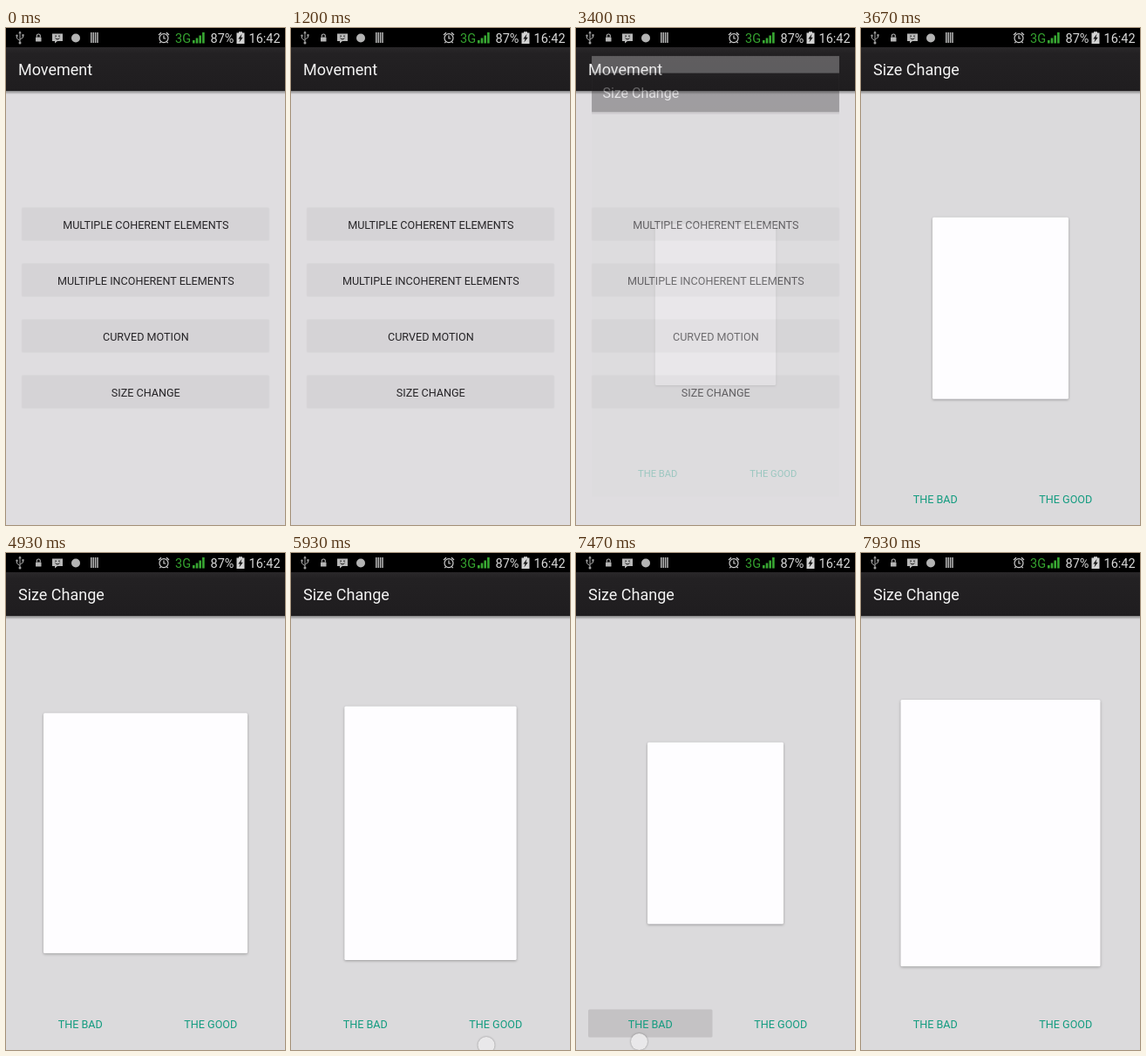
Animation, 320 px wide and 569 px high, one loop 8000 ms. Source, as an HTML page:

```html
<!DOCTYPE html>
<html lang="en">
<head>
<meta charset="utf-8">
<title>Size change</title>
<style>
html, body { margin: 0; width: 100%; height: 100%; overflow: hidden; background: #000; }
svg { display: block; width: 100vw; height: 100vh; font-family: Roboto, "Noto Sans", sans-serif; }
.title { font-size: 18px; fill: #f3f3f3; }
.label { font-size: 12.6px; text-anchor: middle; fill: #262427; }
.action { font-size: 12.6px; text-anchor: middle; fill: #149c80; }
.status { font-size: 14.5px; fill: #d8d8d8; }
#card { filter: drop-shadow(0 1px 1.5px rgba(0,0,0,.3)); }
#dot { filter: drop-shadow(0 0 1.2px rgba(0,0,0,.4)); }
</style>
</head>
<body>
<svg viewBox="0 0 320 569" preserveAspectRatio="none">
  <defs>
    <linearGradient id="bar" x1="0" y1="0" x2="0" y2="1">
      <stop offset="0" stop-color="#2a282a"/><stop offset=".15" stop-color="#232123"/><stop offset="1" stop-color="#1f1d1f"/>
    </linearGradient>
    <linearGradient id="shade" x1="0" y1="0" x2="0" y2="1">
      <stop offset="0" stop-color="#000" stop-opacity=".4"/><stop offset="1" stop-color="#000" stop-opacity="0"/>
    </linearGradient>
    <g id="head">
      <rect y="22" width="320" height="50" fill="url(#bar)"/>
      <rect y="72" width="320" height="4" fill="url(#shade)"/>
    </g>
  </defs>

  <g id="menu">
    <rect width="320" height="569" fill="#dfdde0"/>
    <use href="#head"/>
    <text class="title" x="14" y="54">Movement</text>
  </g>

  <g id="demo">
    <rect width="320" height="569" fill="#dbdadc"/>
    <use href="#head"/>
    <text class="title" x="14" y="54">Size Change</text>
    <rect id="card" rx="1.5" fill="#fefdff"/>
    <rect id="badPress" x="14" y="522.5" width="142.5" height="32" rx="1.5" fill="#c4c2c4"/>
    <rect id="goodPress" x="163.5" y="522.5" width="142.5" height="32" rx="1.5" fill="#c4c2c4"/>
    <text class="action" x="85.3" y="543.7">THE BAD</text>
    <text class="action" x="234.8" y="543.7">THE GOOD</text>
  </g>

  <g id="statusBar">
    <rect width="320" height="22" fill="#000"/>
    <!-- usb -->
    <g fill="none" stroke="#a2a2a2" stroke-width="1">
      <path d="M16 5V17M16 14.5L12.5 12V9M16 13L19.5 11V8.5"/>
      <path d="M14.3 6.2L16 3.2L17.7 6.2Z" fill="#a2a2a2" stroke="none"/>
      <circle cx="16" cy="17" r="1.5" fill="#a2a2a2" stroke="none"/>
      <circle cx="12.5" cy="8.8" r="1.2" fill="#a2a2a2" stroke="none"/>
      <rect x="18.4" y="7.2" width="2.2" height="2.2" fill="#a2a2a2" stroke="none"/>
    </g>
    <!-- lock -->
    <rect x="34" y="10.5" width="6.5" height="5" rx=".6" fill="#b5b5b5"/>
    <path d="M35.3 10.5V9a2 2 0 0 1 4 0V10.5" fill="none" stroke="#b5b5b5" stroke-width="1.1"/>
    <!-- message -->
    <path d="M53 6.5H65V15H59L56 17.5V15H53Z" fill="#b8b8b8"/>
    <path d="M56.5 11.3Q59 14.5 61.5 11.3" fill="none" stroke="#111" stroke-width="1"/>
    <path d="M56.5 8.5h1.2v1.4h-1.2zM60.4 8.5h1.2v1.4h-1.2z" fill="#111"/>
    <circle cx="80" cy="11.5" r="5" fill="#b4b4b4"/>
    <path d="M97.8 5V17M100.2 5V17M102.6 5V17M105 5V17" stroke="#b8b8b8" stroke-width="1.5"/>
    <!-- alarm -->
    <g fill="none" stroke="#cfcfcf" stroke-width="1.2">
      <circle cx="181" cy="11.6" r="5"/>
      <path d="M181 8.5V12H183.4M175 8L178 5.2M187 8L184 5.2M177.6 15.6L176.3 17.2M184.4 15.6L185.7 17.2"/>
    </g>
    <text class="status" x="194" y="17" style="fill:#35a32f">3G</text>
    <path d="M214 14h2.6v3.5h-2.6zM217.7 11.5h2.6v6h-2.6zM221.4 8.5h2.6v9h-2.6zM225.1 5h2.6v12.5h-2.6z" fill="#38a832"/>
    <text class="status" x="234.5" y="17">87%</text>
    <path d="M267 4.2H271V5.6H273.5V18H264.5V5.6H267Z" fill="#d2d2d2"/>
    <path d="M270.6 6.8L266.3 12.4H268.6L267.3 16.6L271.8 10.8H269.4Z" fill="#151515"/>
    <text class="status" x="278.5" y="17">16:42</text>
  </g>

  <circle id="dot" r="9.5" fill="#f1f0f1" fill-opacity=".92"/>
</svg>
<script>
const LOOP = 8000, STEP = 1000 / 15;
const $ = id => document.getElementById(id);
const set = (el, attrs) => { for (const k in attrs) el.setAttribute(k, attrs[k]); };
const add = (parent, tag, attrs) => {
  const el = document.createElementNS("http://www.w3.org/2000/svg", tag);
  set(el, attrs);
  return parent.appendChild(el);
};
const show = (el, on) => el.setAttribute("visibility", on ? "visible" : "hidden");
const progress = (t, start, length) => Math.min(1, Math.max(0, (t - start) / length));
const easeOut = (p, power = 2) => 1 - (1 - p) ** power;
const within = (t, a, b) => t >= a && t < b;

const buttons = ["MULTIPLE COHERENT ELEMENTS", "MULTIPLE INCOHERENT ELEMENTS", "CURVED MOTION", "SIZE CHANGE"]
  .map((name, i) => {
    const y = 205.5 + i * 64;
    const box = add($("menu"), "rect", { x: 18, y, width: 284, height: 38, rx: 1.5, fill: "#d5d3d6", stroke: "#dad8db", "stroke-width": .8 });
    add($("menu"), "text", { class: "label", x: 160.3, y: y + 24.2 }).textContent = name;
    return box;
  });

const taps = [
  { from: 2530, to: 2595, x: 64.5, y: 418 },
  { from: 4660, to: 4795, x: 230, y: 548 },
  { from: 5795, to: 5995, x: 224, y: 563.5 },
  { from: 7460, to: 7595, x: 72.5, y: 559.5 }
];

// Growth of each side, 0 = small, 1 = large.
function growth(t) {
  const side = length => easeOut(progress(t, 4691, length)) - easeOut(progress(t, 5868, length));
  const both = easeOut(progress(t, 7560, 500));
  return [side(240) + both, side(600) + both];
}

function draw(time) {
  const t = Math.floor((time + 6) / STEP) * STEP;

  buttons[3].setAttribute("fill", within(t, 2595, 3125) ? "#c3c1c4" : "#d5d3d6");

  const opened = t >= 3395;
  show($("demo"), opened);
  if (opened) {
    const scale = .8 + .2 * easeOut(progress(t, 3360, 300), 4);
    const at = `translate(160 284.5) scale(${scale}) translate(-160 -284.5)`;
    set($("demo"), { transform: at, opacity: easeOut(progress(t, 3360, 220), 2) });
  }

  const [gw, gh] = growth(t);
  const w = 156 + 78 * gw, h = 208 + 104 * gh;
  set($("card"), { x: 160 - w / 2, y: 320.7 - h / 2, width: w, height: h });

  $("goodPress").setAttribute("opacity", within(t, 5795, 5865) ? 1 : 0);
  $("badPress").setAttribute("opacity", within(t, 7460, 7530) ? 1 : 0);

  const tap = taps.find(p => within(t, p.from, p.to));
  show($("dot"), tap);
  if (tap) set($("dot"), { cx: tap.x, cy: tap.y });
}

const begin = performance.now();
function tick() {
  draw((performance.now() - begin) % LOOP);
  requestAnimationFrame(tick);
}
draw(0);
requestAnimationFrame(tick);
</script>
</body>
</html>
```
